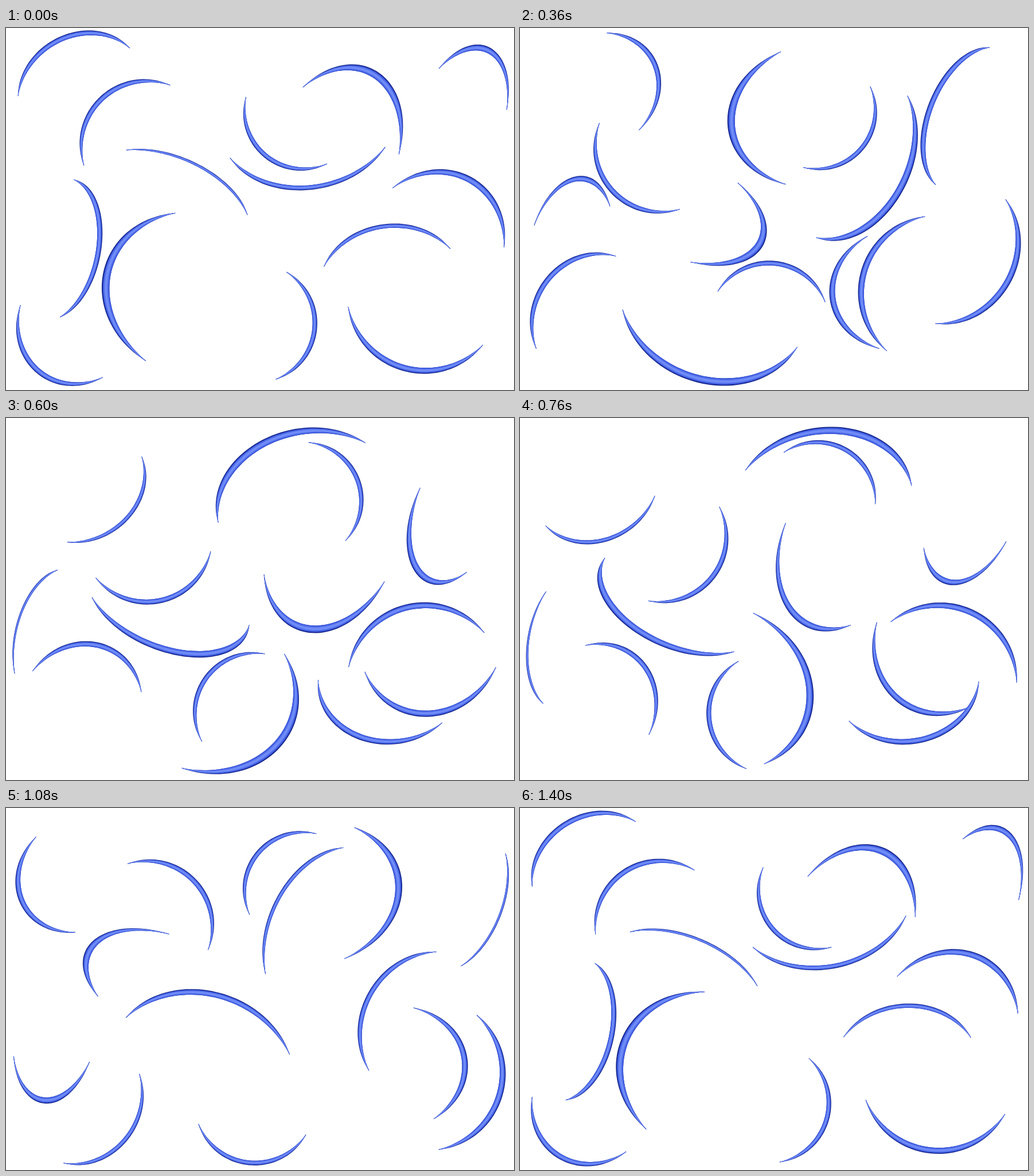
Write an HTML page with a canvas that moves like this. It is 886 px wide and 632 px high and loops after 1.44 s.

```html
<!DOCTYPE html>
<html lang="en">
<head>
<meta charset="utf-8">
<title>Spinning arcs</title>
<style>
  html, body { margin: 0; width: 100%; height: 100%; overflow: hidden; background: #fff; }
  canvas { display: block; }
</style>
</head>
<body>
<canvas id="stage" width="886" height="632"></canvas>
<script>
const ctx = document.getElementById('stage').getContext('2d');

const LOOP = 1440, STEP = 40;
const DEG = Math.PI / 180;
const HALF = 64 * DEG;    // half the angle an arc spans
const THICK = 0.039;      // half thickness on the unit circle
const LEAN = 0.51;        // the flatter a ring, the stronger its perspective
const SEGMENTS = 48;

// A unit circle seen in perspective: centre, half axes, starting angle of the
// arc and tilt in degrees. A negative b turns the other way.
// The result maps (angle, radius) to a stage point.
function ring(x, y, a, b, start, tilt = 0) {
  const lean = LEAN * (1 - Math.abs(b) / a);
  const cos = Math.cos(tilt * DEG), sin = Math.sin(tilt * DEG);
  return (angle, r) => {
    const u = r * Math.cos(angle + start * DEG);
    const v = r * Math.sin(angle + start * DEG);
    const w = 1 + lean * v;
    const px = a * u / w, py = b * v / w;
    return [x + px * cos - py * sin, y + px * sin + py * cos];
  };
}

const rings = [
  // round
  ring(245.5, 206.8, 114.5, -114.5, 133),
  ring(517.8, 144.2, 102, -102, 230.5),
  ring(434, 515.1, 104.8, -104.8, 354.3),
  ring(730.5, 462.7, 135.8, 135.8, 105.8),
  // tilted
  ring(135.3, 118.7, 114.9, 98.8, 281, 327),
  ring(289.7, 294.5, 147.3, 83.7, 100, 203),
  ring(72.2, 383.4, 122.6, -68.9, 280, 282),
  ring(343.7, 459.6, 168.7, -144.3, 190.5, 21.4),
  ring(133.4, 510.6, 116.4, 105.4, 190.5, 301),
  ring(553.9, 211.9, 154.9, 108.9, 191.5, 114),
  ring(529.4, 163.6, 158.8, 125.9, 100.5, 348),
  ring(805.1, 166.9, 129.3, -72.9, 180, 111.5),
  ring(737.7, 380.6, 135.6, 122.3, 179.5, 120),
  ring(671.4, 447.1, 128, -109.2, 90.5, 352.4)
];

// Inner edge, outer edge (-1 to 1), colour
const bands = [
  [-1, 1, '#14248c'],
  [-1, 0.72, '#3d5be0'],
  [-0.68, 0.45, '#5875ec'],
  [-0.4, 0.2, '#708cf7']
];

const taper = k => 1 - Math.abs(k) ** 2.5;

// Adds one edge of an arc to the path, k running from one tip to the other.
function edge(ring, mid, v, dir = 1) {
  for (let i = 0; i <= SEGMENTS; i++) {
    const k = dir * (2 * i / SEGMENTS - 1);
    ctx.lineTo(...ring(mid + k * HALF, 1 + v * THICK * taper(k)));
  }
}

function drawArc(ring, mid) {
  // A hairline keeps the fine tips visible
  ctx.beginPath();
  edge(ring, mid, 0);
  ctx.stroke();
  for (const [inner, outer, color] of bands) {
    ctx.beginPath();
    edge(ring, mid, outer);
    edge(ring, mid, inner, -1);
    ctx.fillStyle = color;
    ctx.fill();
  }
}

function draw(ms) {
  const turn = Math.floor(ms % LOOP / STEP) * STEP / LOOP * 2 * Math.PI;
  ctx.fillStyle = '#fff';
  ctx.fillRect(0, 0, 886, 632);
  ctx.lineWidth = 1.2;
  ctx.strokeStyle = '#3d5be0';
  for (const r of rings) drawArc(r, turn);
}

const start = performance.now();
function tick() {
  draw(performance.now() - start);
  requestAnimationFrame(tick);
}
tick();
</script>
</body>
</html>
```
